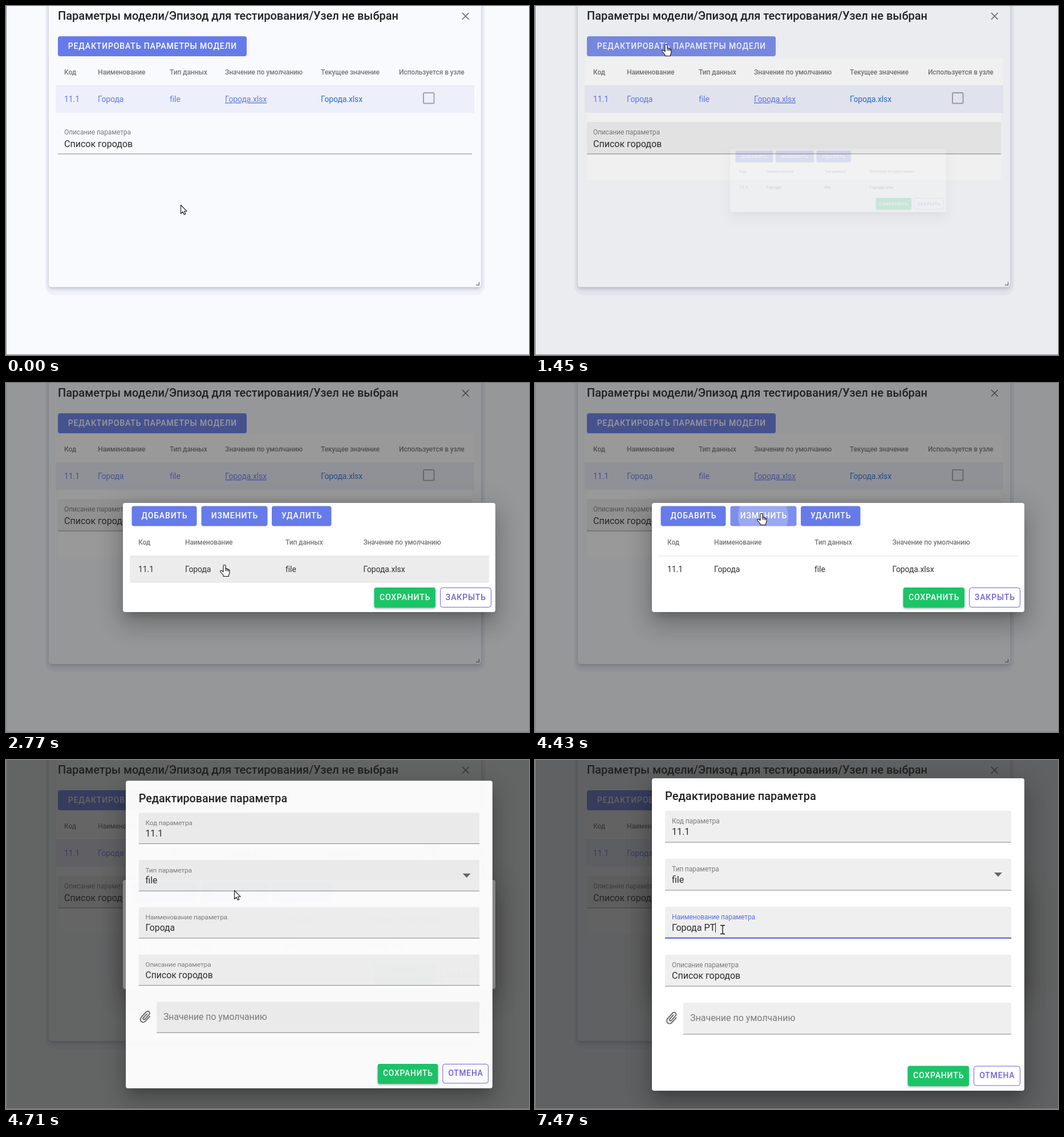
Recreate the animation shown at these times as an HTML page. Size 917 px wide and 611 px high, loop 8000 ms.

```html
<!DOCTYPE html>
<html lang="ru">
<head>
<meta charset="utf-8">
<title>Параметры модели</title>
<style>
html, body { margin: 0; width: 100%; height: 100%; overflow: hidden; background: #f9fafd; }
svg { display: block; width: 917px; height: 611px; }
text { font-family: Roboto, "Noto Sans", sans-serif; white-space: pre; }
.title { font-size: 20px; font-weight: 500; fill: #212124; }
.head { font-size: 12px; font-weight: 500; letter-spacing: -.12px; fill: #77777b; }
.cell { font-size: 14px; letter-spacing: -.1px; fill: #333; }
.label { font-size: 12px; letter-spacing: -.12px; fill: #7c7c7e; }
.value { font-size: 16px; fill: #2b2b2b; }
.hint { font-size: 16px; fill: #7b7b7b; }
.btn { font-size: 14px; font-weight: 500; letter-spacing: .85px; text-anchor: middle; }
</style>
</head>
<body>
<svg id="stage" viewBox="0 0 917 611">
  <defs>
    <filter id="soft" x="-10%" y="-10%" width="120%" height="125%">
      <feDropShadow dx="0" dy="3" stdDeviation="3" flood-color="#000" flood-opacity=".2"/>
    </filter>
    <filter id="lift" x="-10%" y="-20%" width="120%" height="160%">
      <feDropShadow dx="0" dy="2" stdDeviation="1.5" flood-color="#000" flood-opacity=".25"/>
    </filter>
    <clipPath id="clipEdit"><rect x="91" y="53" width="331" height="35" rx="4"/></clipPath>
    <clipPath id="clipChange"><rect x="342.5" y="215.5" width="116" height="35" rx="4"/></clipPath>
  </defs>
</svg>
<script>
const LOOP = 8000;
const BLUE = '#667bea', GREEN = '#1bc468', VIOLET = '#6f60e3';
// Screen refresh moments, ms
const TICKS = [0, 150, 300, 430, 580, 720, 870, 1010, 1150, 1300, 1450, 1610, 1760,
  2190, 2340, 2480, 2620, 2770, 3700, 3850, 3990, 4130, 4430, 4560, 4710, 4850, 5010,
  5310, 5450, 5600, 5740, 5890, 6180, 6320, 6470, 6610, 6750, 7190, 7470];
// Pointer moves: start, end, from x, y, to x, y
const MOVES = [
  [0, 1150, 306, 348, 230, 67],
  [2190, 2770, 230, 67, 383, 318],
  [3700, 4130, 383, 318, 397, 228],
  [4560, 4710, 397, 228, 400, 228],
  [5310, 5890, 400, 228, 329, 297]
];
// Dialog shadow layers: offset y, blur, spread, opacity
const SHADOWS = [[11, 15, -7, .2], [24, 38, 3, .14], [9, 46, 8, .12]];
const HEADS = ['Код', 'Наименование', 'Тип данных', 'Значение по умолчанию', 'Текущее значение', 'Используется в узле'];
const CELLS = ['11.1', 'Города', 'file', 'Города.xlsx', 'Города.xlsx'];

const stage = document.getElementById('stage');

function add(parent, tag, attrs, content) {
  const el = document.createElementNS('http://www.w3.org/2000/svg', tag);
  set(el, attrs);
  if (content) el.textContent = content;
  parent.appendChild(el);
  return el;
}
function set(el, attrs) {
  for (const key in attrs) el.setAttribute(key, attrs[key]);
}
function show(el, on) { el.style.display = on ? '' : 'none'; }
const group = (parent, attrs) => add(parent, 'g', attrs);
const rect = (parent, x, y, width, height, fill, more) =>
  add(parent, 'rect', { x, y, width, height, fill, ...more });
const label = (parent, cls, x, y, str, more) => add(parent, 'text', { class: cls, x, y, ...more }, str);
const path = (parent, d, more) => add(parent, 'path', { d, fill: 'none', ...more });

function button(parent, x, y, w, h, str, fill, more) {
  const box = rect(parent, x, y, w, h, fill, { rx: 4, ...more });
  const ink = fill === 'none' ? VIOLET : '#fff';
  const text = label(parent, 'btn', x + w / 2 + .4, Math.floor(y + h / 2 + 4.5), str, { fill: ink });
  return { box, text };
}

function ripple(parent, btn, cx, cy, clip) {
  const g = group(parent, { 'clip-path': `url(#${clip})` });
  parent.insertBefore(g, btn.text);
  return add(g, 'circle', { cx, cy, r: 0, fill: '#fff' });
}

function field(parent, x, y, w, name, value) {
  rect(parent, x, y, w, 55, '#efefef', { rx: 3 });
  const line = rect(parent, x, y + 54.5, w, 1, '#858585');
  if (!value) {
    label(parent, 'hint', x + 12, y + 32, name);
    return { line };
  }
  return {
    line,
    caption: label(parent, 'label', x + 12, y + 22, name),
    text: label(parent, 'value', x + 12, y + 42, value)
  };
}

function dialog(y, h) {
  const shade = rect(stage, 0, 0, 917, 611, '#212121');
  const g = group(stage);
  for (const [dy, blur, spread, opacity] of SHADOWS)
    rect(g, 205 - spread, y + dy - spread, 653 + 2 * spread, h + 2 * spread, '#000',
      { rx: 4, opacity, style: `filter:blur(${blur / 2}px)` });
  rect(g, 205, y, 653, h, '#fff', { rx: 4 });
  return { shade, g, cy: y + h / 2 };
}

// Main page
const page = group(stage);
rect(page, 0, 0, 917, 611, '#f9fafd');
rect(page, 69, -40, 771, 546, '#eff1fb', { rx: 16 });
rect(page, 75, -40, 758, 532, '#f9fafd', { rx: 5, filter: 'url(#soft)' });
const washed = group(page);
rect(washed, 87, 90, 734, 50, '#fefefe');
rect(washed, 91, 187, 726, 117, '#fefefe');
rect(washed, 91, 203, 726, 56, '#efefef', { rx: 3 });
label(page, 'title', 91, 24, 'Параметры модели/Эпизод для тестирования/Узел не выбран');
path(page, 'M800 12L811.5 23.5M811.5 12L800 23.5', { stroke: '#6a6a6c', 'stroke-width': 1.7 });
const edit = button(page, 91, 53, 331, 35, 'РЕДАКТИРОВАТЬ ПАРАМЕТРЫ МОДЕЛИ', BLUE);
const editRipple = ripple(page, edit, 238.5, 70, 'clipEdit');
rect(page, 87, 139, 734, 1, '#e6e7ec');
rect(page, 87, 140, 734, 47, '#edeffb');
const cols = [102, 161, 287, 384, 552, 689];
HEADS.forEach((s, i) => label(page, 'head', cols[i], 120, s));
CELLS.forEach((s, i) => label(page, 'cell', cols[i], 168, s, {
  style: `fill:${i === 4 ? '#2a6fd0' : BLUE}${i === 3 ? ';text-decoration:underline' : ''}`
}));
rect(page, 732, 152, 18.5, 18.5, 'none', { rx: 1.5, stroke: '#a2a2a8', 'stroke-width': 2 });
label(page, 'label', 102, 225, 'Описание параметра');
label(page, 'value', 102, 247, 'Список городов');
rect(page, 91, 258.5, 726, 1, '#858585');
path(page, 'M829.5 483V488.5H824', { stroke: '#777', 'stroke-width': 1.3 });

// Parameter list dialog
const list = dialog(210, 191);
const rowHover = rect(list.g, 217, 303, 630, 47, '#ececec');
button(list.g, 220.5, 215.5, 114, 35, 'ДОБАВИТЬ', BLUE);
const change = button(list.g, 342.5, 215.5, 116, 35, 'ИЗМЕНИТЬ', BLUE);
const changeRipple = ripple(list.g, change, 400, 233, 'clipChange');
button(list.g, 466, 215.5, 104.5, 35, 'УДАЛИТЬ', BLUE);
const listCols = [232, 314, 490, 626.5];
listCols.forEach((x, i) => {
  label(list.g, 'head', x, 283, HEADS[i]);
  label(list.g, 'cell', x, 331, CELLS[i]);
});
rect(list.g, 217, 302.5, 630, 1, '#e0e0e0');
button(list.g, 645.5, 358, 107.5, 35.5, 'СОХРАНИТЬ', GREEN, { filter: 'url(#lift)' });
button(list.g, 761.5, 358.5, 89, 34, 'ЗАКРЫТЬ', 'none', { stroke: VIOLET });

// Parameter form dialog
const form = dialog(32, 547);
label(form.g, 'title', 228, 70, 'Редактирование параметра');
field(form.g, 228, 89, 607, 'Код параметра', '11.1');
field(form.g, 228, 173, 607, 'Тип параметра', 'file');
path(form.g, 'M805 197H819L812 204.5Z', { fill: '#666' });
const nameField = field(form.g, 228, 257, 607, 'Наименование параметра', 'Города');
const focusLine = rect(form.g, 0, 310.5, 0, 2, '#5b6ee6');
const caret = rect(form.g, 0, 285, 1, 17, '#222');
field(form.g, 228, 341, 607, 'Описание параметра', 'Список городов');
field(form.g, 260, 425, 575, 'Значение по умолчанию');
path(form.g, 'M4.7 -6V5.5A4.7 4.7 0 0 1 -4.7 5.5V-7A3.2 3.2 0 0 1 1.8 -7V3.5A1.7 1.7 0 0 1 -1.6 3.5V-6',
  { stroke: '#6f6f6f', 'stroke-width': 1.9, transform: 'translate(240 452) rotate(42) scale(1.08)' });
button(form.g, 653.5, 535.5, 107.5, 35.5, 'СОХРАНИТЬ', GREEN, { filter: 'url(#lift)' });
button(form.g, 769.5, 536, 81, 34, 'ОТМЕНА', 'none', { stroke: VIOLET });

// Pointers and window edge
const ink = { stroke: '#111', 'stroke-width': 1.1, 'stroke-linejoin': 'round' };
const cursors = { arrow: group(stage), hand: group(stage), beam: group(stage) };
path(cursors.arrow, 'M.5 .5V15.5L4 12.2L6.4 17.3L8.8 16.2L6.5 11.2H11Z', { ...ink, fill: '#fff' });
path(cursors.hand, 'M-2 12V2Q-2 .5 0 .5T2 2V7Q4 6 4.5 8Q6.5 7 7 9Q9 8.3 9 10.5V14Q9 16 7.5 18V20.5H-2V18.5Q-4 16 -7 12.5Q-7.8 10.5 -5.5 10.2Q-4 10.5 -2 12.5Z',
  { ...ink, fill: '#fff' });
path(cursors.hand, 'M2 7V11M4.5 8V11.5M7 9V12', ink);
path(cursors.beam, 'M-4 -7.5H-1L0 -6.5L1 -7.5H4M0 -6.5V7M-4 7.5H-1L0 6.5L1 7.5H4', { ...ink, 'stroke-width': 1.3 });
rect(stage, 0, 0, 1, 611, '#858587');
rect(stage, 0, 610, 917, 1, '#858587');

const clamp = v => Math.max(0, Math.min(1, v));
const smooth = v => v * v * (3 - 2 * v);

// y of cubic-bezier(.25, .8, .25, 1) at x
function easeOut(x) {
  let lo = 0, hi = 1;
  for (let i = 0; i < 20; i++) {
    const s = (lo + hi) / 2;
    if (.75 * s - .75 * s * s + s ** 3 < x) lo = s; else hi = s;
  }
  return 2.4 * lo - 1.8 * lo * lo + .4 * lo ** 3;
}

function pointerAt(t) {
  let pos = [306, 348];
  for (const [t0, t1, x0, y0, x1, y1] of MOVES) {
    if (t < t0) break;
    const k = smooth(clamp((t - t0) / (t1 - t0)));
    pos = [x0 + (x1 - x0) * k, y0 + (y1 - y0) * k];
  }
  return pos;
}

function pointerKind(t, y) {
  if (t < 2190) return y < 88 ? 'hand' : 'arrow';
  if (t < 4710) return y > 303 || (t > 3000 && y < 250) ? 'hand' : 'arrow';
  return y > 257 ? 'beam' : 'arrow';
}

function openDialog(d, t, start) {
  const p = easeOut(clamp((t - start) / 225));
  const on = t > start;
  show(d.g, on);
  show(d.shade, on);
  const s = .5 + p / 2;
  set(d.g, { opacity: p, transform: `translate(531.5 ${d.cy}) scale(${s}) translate(-531.5 ${-d.cy})` });
  set(d.shade, { opacity: .46 * easeOut(clamp((t - start) / 260)) });
}

function playRipple(el, t, start, r, grow) {
  const age = t - start;
  show(el, age >= 0 && age < 260);
  set(el, { r: r + Math.max(0, age) * grow, opacity: age < 100 ? .24 : .14 });
}

function draw(time) {
  const t = TICKS.filter(v => v <= time).pop();
  const [x, y] = pointerAt(t);
  const kind = pointerKind(t, y);
  for (const name in cursors) show(cursors[name], name === kind);
  set(cursors[kind], { transform: `translate(${Math.round(x)} ${Math.round(y)})` });

  show(washed, t >= 430);
  set(edit.box, { fill: t < 1450 && kind === 'hand' ? '#778aec' : BLUE });
  playRipple(editRipple, t, 1300, 82, .7);

  openDialog(list, t, 1439);
  show(rowHover, t > 2190 && t < 4430 && kind === 'hand' && y > 303);
  set(change.box, { fill: t > 3000 && t < 4710 && kind === 'hand' && y < 250 ? '#7c8eed' : BLUE });
  playRipple(changeRipple, t, 4430, 44, .2);

  openDialog(form, t, 4572);
  const focused = t >= 6180;
  const hovered = kind === 'beam';
  nameField.line.setAttribute('fill', hovered ? '#444' : '#858585');
  nameField.caption.style.fill = focused ? '#5b6ee6' : '';
  const half = focused ? 303.5 * easeOut(clamp((t - 6130) / 300)) : 0;
  set(focusLine, { x: 531.5 - half, width: 2 * half });
  const typed = (t >= 6750) + (t >= 7190) + (t >= 7470);
  nameField.text.textContent = 'Города' + ' РТ'.slice(0, typed);
  show(caret, focused);
  if (focused) set(caret, { x: Math.round(240 + nameField.text.getComputedTextLength()) });
}

const began = performance.now();
function frame() {
  draw((performance.now() - began) % LOOP);
  requestAnimationFrame(frame);
}
frame();
</script>
</body>
</html>
```
